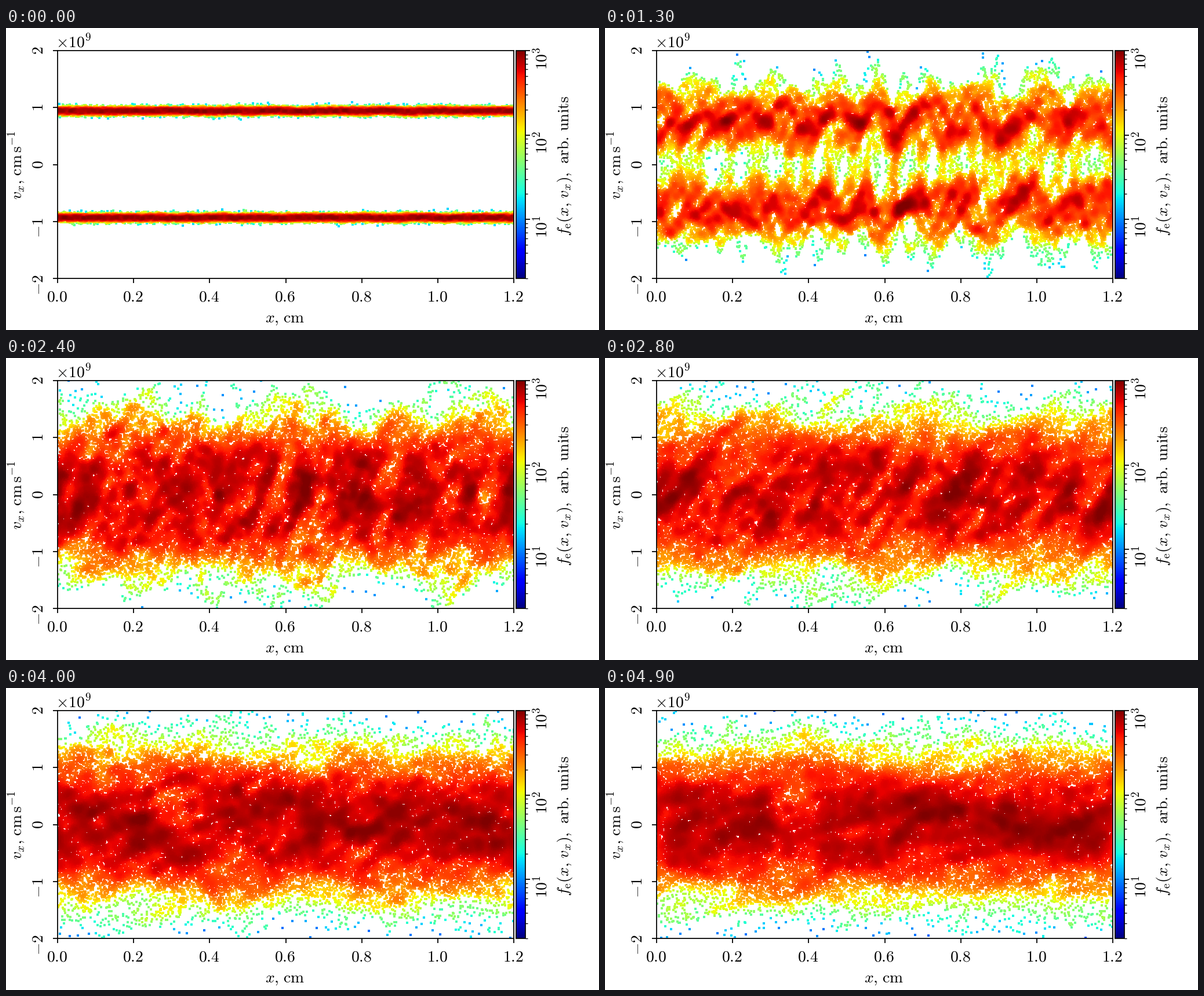
A matplotlib script for the animation above (5 s loop, 1023 px wide and 521 px high).

```python
import numpy as np
import matplotlib.pyplot as plt
from matplotlib.animation import FuncAnimation
from matplotlib.cm import ScalarMappable
from matplotlib.colors import LogNorm

plt.rcParams["mathtext.fontset"] = "cm"

W, H, DPI = 1023, 521, 128
LEFT, RIGHT, TOP, BOTTOM = 89, 876, 39, 432
NX, NY = RIGHT - LEFT, BOTTOM - TOP
FRAMES, SUBSTEPS = 50, 6
L, VMAX = 1.2, 2.0          # cm, 1e9 cm/s
DT = 0.0167 / SUBSTEPS
LAYERS, PER_BEAM = 12, 1920
COUNT = LAYERS * 2 * PER_BEAM
CELLS, OMEGA = 240, 70.0
DOT = 4

rng = np.random.default_rng(8)
layer = np.repeat(np.arange(LAYERS), 2 * PER_BEAM)
side = np.tile(np.repeat([1.0, -1.0], PER_BEAM), LAYERS)


def ramp(t, times, values):
    return np.interp(t, times, values)


# ---- two-stream instability in independent layers, seen in projection ----

def heat(v, t):
    """Keep the velocity order, relax the spread to two merging humps."""
    times = [0, 4, 8, 13, 17, 24, 33, 49]
    mean = ramp(t, times, [0.937, 0.935, 0.91, 0.75, 0.55, 0.50, 0.46, 0.40])
    width = ramp(t, times, [0.037, 0.06, 0.125, 0.33, 0.48, 0.50, 0.51, 0.52])
    g = np.linspace(-3, 3, 4001)
    pdf = sum(np.exp(-0.5 * ((g - s * mean) / width) ** 2) for s in (1, -1))
    cdf = np.cumsum(pdf)
    out = np.empty_like(v)
    out[np.argsort(v)] = np.interp((np.arange(v.size) + 0.5) / v.size,
                                   cdf / cdf[-1], g)
    return out


def push(x, omega):
    """Acceleration of each particle in the field of its own layer."""
    s = x / L * CELLS
    cell = s.astype(int)
    f = s - cell
    i = cell % CELLS + layer * CELLS
    j = (cell + 1) % CELLS + layer * CELLS
    size = LAYERS * CELLS
    n = np.bincount(i, 1 - f, size) + np.bincount(j, f, size)
    spec = np.fft.rfft(n.reshape(LAYERS, CELLS) * size / COUNT - 1)
    k = 2 * np.pi * np.arange(spec.shape[1]) / L
    spec[:, 0] = 0
    spec[:, 1:] /= 1j * k[1:]
    a = omega ** 2 * np.fft.irfft(spec, CELLS).ravel()
    return a[i] * (1 - f) + a[j] * f


def seed_wave(x):
    """Growing modes; each beam lags or leads the field by 60 degrees."""
    dv = np.zeros_like(x)
    for n in range(4, 14):
        k = 2 * np.pi * n / L
        phase = rng.uniform(0, 2 * np.pi, LAYERS)[layer]
        lag = side * np.pi / 3
        dv += 0.005 * np.cos(k * x - phase - lag)
        if n == 8:
            dv += 0.004 * np.cos(k * (x - 0.245) - lag)
    return dv


def simulate():
    step = np.tile(np.arange(PER_BEAM), 2 * LAYERS)
    x = (step + (layer + 0.5) / LAYERS) / PER_BEAM * L
    v = side * 0.937 + rng.normal(0, 0.037, COUNT) + seed_wave(x)
    v = heat(v, 0)
    states = []
    for t in range(FRAMES):
        states.append((x.copy(), v.copy()))
        omega = OMEGA * np.sqrt(ramp(t, [0, 15, 24, 49], [1, 1, 0.15, 0.03]))
        for _ in range(SUBSTEPS):
            x = (x + v * DT) % L
            v = v + push(x, omega) * DT
        kick = ramp(t, [0, 8, 10, 17, 20, 49],
                    [0.02, 0.02, 0.055, 0.055, 0.02, 0.015])
        v = heat(v + rng.normal(0, kick, COUNT), t + 1)
    return states


states = simulate()

# ---- density colouring ----

cmap, norm = plt.get_cmap("jet"), LogNorm(2, 1000)
FX = np.fft.rfftfreq(NX)[None, :]
FY = np.fft.fftfreq(NY)[:, None]


def density(ix, iy, t):
    n = np.bincount(iy * NX + ix, minlength=NX * NY).reshape(NY, NX)
    times = [0, 8, 17, 49]
    sx = ramp(t, times, [2.2, 4, 5, 7])
    sy = ramp(t, times, [1.2, 3.5, 5.5, 7])
    kernel = np.exp(-2 * np.pi ** 2 * ((sx * FX) ** 2 + (sy * FY) ** 2))
    smooth = np.fft.irfft2(np.fft.rfft2(n) * kernel, (NY, NX))
    return smooth[iy, ix]


def widen(a, axis):
    """Grow every point to DOT pixels along one axis."""
    pad = [(0, 0), (0, 0)]
    pad[axis] = (DOT // 2, DOT - 1 - DOT // 2)
    p = np.pad(a, pad)
    size = a.shape[axis]
    parts = [p.take(range(d, d + size), axis) for d in range(DOT)]
    return np.maximum.reduce(parts)


def picture(t):
    x, v = states[t]
    inside = np.abs(v) < VMAX
    ix = np.minimum((x[inside] / L * NX).astype(int), NX - 1)
    iy = np.minimum(((v[inside] + VMAX) / (2 * VMAX) * NY).astype(int), NY - 1)
    n = density(ix, iy, t)
    c = np.clip(1000 * n / np.percentile(n, 99.8), 2, 1000)
    grid = np.zeros((NY, NX))
    grid[iy, ix] = c
    grid = widen(widen(grid, 0), 1)
    rgba = cmap(norm(np.maximum(grid, 2)), bytes=True)
    rgba[grid == 0] = 255
    return rgba


# ---- figure ----

fig = plt.figure(figsize=(W / DPI, H / DPI), dpi=DPI, facecolor="white")


def box(x0, x1):
    return fig.add_axes([x0 / W, 1 - BOTTOM / H, (x1 - x0) / W, NY / H])


def label(x, y, text, ha="center", rotation=0):
    fig.text(x / W, 1 - y / H, text, fontsize=15.5, ha=ha, va="baseline",
             rotation=rotation, rotation_mode="anchor")


ax = box(LEFT, RIGHT)
im = ax.imshow(picture(0), extent=[0, L, -VMAX, VMAX], origin="lower",
               aspect="auto", interpolation="nearest")
ax.set_xticks(np.linspace(0, L, 7))
ax.set_yticks(range(-2, 3))
ax.tick_params(length=4.4, width=1, labelbottom=False, labelleft=False)
for spine in ax.spines.values():
    spine.set_linewidth(1)

bar = fig.colorbar(ScalarMappable(norm, cmap), cax=box(880, 896))
bar.outline.set_linewidth(1)
bar.ax.tick_params(which="both", labelright=False)
bar.ax.tick_params(which="major", length=4.4, width=1)
bar.ax.tick_params(which="minor", length=2.5, width=0.75)

for i in range(7):
    label(LEFT - 1 + i * NX / 6, 471.5, f"${i * 0.2:.1f}$")
for i in range(-2, 3):
    sign = "{-}" if i < 0 else ""
    y = (TOP + BOTTOM) / 2 - i * NY / 4
    label(64, y - 7, f"${sign}{abs(i)}$", "right", 90)
for p in (1, 2, 3):
    y = TOP + (3 - p) * NY / np.log10(500)
    label(933.5, y - 7, f"$10^{p}$", "right", 90)

label(85.5, 33, r"${\times}10^9$", "left")
label(481.5, 507.5, r"$x{,}\ \mathrm{cm}$")
label(27.5, 237, r"$v_x{,}\ \mathrm{cm\,s}^{-1}$", rotation=90)
label(971, 237.5, r"$f_\mathrm{e}(x{,}\ v_x){,}\;\ \mathrm{arb.\,units}$",
      rotation=90)


def update(t):
    im.set_data(picture(t))
    return [im]


anim = FuncAnimation(fig, update, frames=FRAMES, interval=100,
                     repeat=True, repeat_delay=0, blit=False)
plt.show()
```
